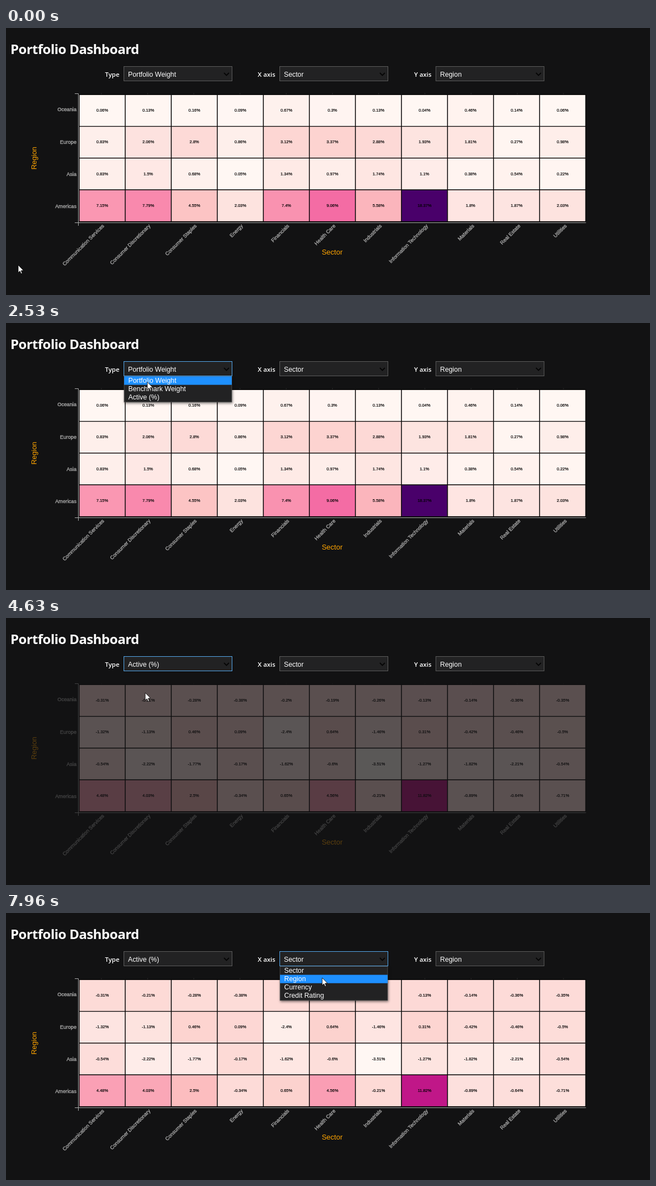
Animation of 1161x482 px, one loop 8 s. Source, as an HTML page:

```html
<!DOCTYPE html>
<html lang="en">
<head>
<meta charset="utf-8">
<title>Portfolio Dashboard</title>
<style>
  html, body { margin: 0; height: 100%; overflow: hidden; background: #121213; }
  svg { display: block; font-family: "Liberation Sans", Arial, sans-serif; }
  .title, .label { font-family: "Open Sans", "Noto Sans", sans-serif; fill: #fff; }
  .title { font-size: 24px; font-weight: 700; letter-spacing: -.5px; }
  .label { font-size: 11.4px; font-weight: 600; text-anchor: end; }
  .field { font-size: 12.3px; fill: #fff; }
  .value { font-size: 7.4px; text-anchor: middle; stroke: #000; stroke-width: .2px; }
  .tick { font-size: 9.2px; text-anchor: end; fill: #aaa; stroke: #aaa; stroke-width: .35px; }
  .axis { font-size: 13px; text-anchor: middle; fill: orange; }
  .list { filter: drop-shadow(1px 2px 2px rgba(0, 0, 0, .5)); }
</style>
</head>
<body>
<svg id="stage" width="1161" height="482" viewBox="0 0 1161 482"></svg>
<script>
const LOOP = 8000;
const sectors = ['Communication Services', 'Consumer Discretionary', 'Consumer Staples', 'Energy', 'Financials',
  'Health Care', 'Industrials', 'Information Technology', 'Materials', 'Real Estate', 'Utilities'];
const regions = ['Oceania', 'Europe', 'Asia', 'Americas'];
const weights = [
  [.06, .13, .16, .09, .67, .3, .13, .04, .46, .14, .06],
  [.83, 2.06, 2.8, .86, 3.12, 3.37, 2.88, 1.93, 1.81, .27, .98],
  [.83, 1.5, .68, .05, 1.34, .97, 1.74, 1.1, .38, .54, .22],
  [7.15, 7.79, 4.55, 2.03, 7.4, 9.06, 5.58, 18.37, 1.8, 1.87, 2.03]];
const active = [
  [-.31, -.21, -.28, -.38, -.2, -.19, -.26, -.13, -.14, -.36, -.35],
  [-1.32, -1.13, .46, .09, -2.4, .64, -1.46, .31, -.42, -.46, -.5],
  [-.54, -2.22, -1.77, -.17, -1.62, -.6, -3.51, -1.27, -1.82, -2.21, -.54],
  [4.48, 4.03, 2.5, -.34, .65, 4.56, -.21, 11.82, -.89, -.64, -.71]];

// Red-purple colour scale, smoothed with a cubic B-spline
const ramp = ['fff7f3', 'fde0dd', 'fcc5c0', 'fa9fb5', 'f768a1', 'dd3497', 'ae017e', '7a0177', '49006a']
  .map(hex => [0, 2, 4].map(i => parseInt(hex.slice(i, i + 2), 16)));
function color(t) {
  const n = ramp.length - 1, i = Math.min(n - 1, Math.floor(t * n)), f = t * n - i;
  const rgb = [0, 1, 2].map(k => {
    const b = ramp[i][k], c = ramp[i + 1][k];
    const a = i > 0 ? ramp[i - 1][k] : 2 * b - c;
    const d = i < n - 1 ? ramp[i + 2][k] : 2 * c - b;
    return Math.round(((1 - f) ** 3 * a + (4 - 6 * f * f + 3 * f ** 3) * b
      + (1 + 3 * f + 3 * f * f - 3 * f ** 3) * c + f ** 3 * d) / 6);
  });
  return `rgb(${rgb})`;
}

const text = (cls, x, y, str, extra = '') => `<text class="${cls}" x="${x}" y="${y}" ${extra}>${str}</text>`;
const rect = (x, y, w, h, extra) => `<rect x="${x}" y="${y}" width="${w}" height="${h}" ${extra}/>`;

function chart(id, data, min, max) {
  let s = rect(131.5, 119.5, 914, 231, 'fill="#0a0a0a"');
  data.forEach((row, r) => row.forEach((v, c) => {
    const x = 132 + 83 * c, y = 120.3 + 57.3 * r;
    s += rect(x, y, 83, 57.3, `fill="${color((v - min) / (max - min))}" stroke="#0a0a0a" stroke-width="1.3"`);
    s += text('value', x + 41.5, 150.8 + 57.5 * r, v + '%');
  }));
  regions.forEach((name, r) => s += text('tick', 127, 150.3 + 58.2 * r, name));
  sectors.forEach((name, c) => {
    const x = 177.5 + 83.4 * c;
    s += text('tick', x, 358, name, `transform="rotate(-45 ${x} 358)"`);
    s += rect(171.5 + 83.3 * c, 117.5, 1, 2, 'fill="#333"');
  });
  s += '<path d="M124 118.5H130.5V357M124 351.5H1045.5" fill="none" stroke="#aaa"/>';
  s += text('axis', 588, 409, 'Sector') + text('axis', 55, 235, 'Region', 'transform="rotate(-90 55 235)"');
  return `<g id="${id}">${s}</g>`;
}

const select = (id, x, label, value) =>
  text('label', x - 7.5, 88, label) +
  rect(x + .5, 69.5, 195, 26, `id="${id}Box" fill="#222223" stroke="#5c5c5c"`) +
  text('field', x + 8, 87.5, value, `id="${id}Value"`) +
  `<path d="M${x + 181} 81l4.5 4.5l4.5 -4.5" fill="none" stroke="#050505" stroke-width="1.8"/>`;

const list = (id, x, items) => `<g id="${id}List">` +
  rect(x + 1, 96.5, 194, 15.1 * items.length + 1, 'class="list" fill="#222223" stroke="#555" stroke-width=".8"') +
  rect(x + 1, 96.5, 194, 15.1, `id="${id}Hover" fill="#1e90ff"`) +
  items.map((item, i) => text('field', x + 8.5, 108 + 15.1 * i, item)).join('') + '</g>';

const stage = document.getElementById('stage');
stage.innerHTML =
  text('title', 8, 47, 'Portfolio Dashboard') +
  select('type', 212, 'Type', 'Portfolio Weight') +
  select('xAxis', 493, 'X axis', 'Sector') +
  select('yAxis', 774.5, 'Y axis', 'Region') +
  chart('weightChart', weights, .04, 18.37) +
  chart('activeChart', active, -3.51, 18.37) +
  list('type', 212, ['Portfolio Weight', 'Benchmark Weight', 'Active (%)']) +
  list('xAxis', 493, ['Sector', 'Region', 'Currency', 'Credit Rating']) +
  '<path id="cursor" d="M0 0V13.6L3.1 10.8L5.2 15.6L7.2 14.7L5.2 10.1L9.5 9.7Z" fill="#fff" stroke="#000" stroke-width=".8"/>';

const el = {};
stage.querySelectorAll('[id]').forEach(e => el[e.id] = e);

const clamp = v => Math.max(0, Math.min(1, v));
const smooth = u => u * u * (3 - 2 * u);
const out = u => 1 - (1 - u) ** 2;
const fastOut = u => 1 - (1 - u) ** 4;
const backIn = u => u * u * (2.70158 * u - 1.70158);

// Pointer moves: start and end time, easing, then points of a line or quadratic curve
const moves = [
  [660, 760, smooth, [22, 428], [-12, 384]],
  [930, 1600, out, [-10, 124], [120, 44], [258, 83]],
  [2330, 2760, smooth, [258, 83], [251, 135]],
  [4700, 5200, smooth, [251, 135], [420, 60], [570, 80]],
  [5460, 6000, fastOut, [570, 82], [769, 88], [797, 85]],
  [6200, 6500, smooth, [797, 85], [620, 80]],
  [7030, 7500, smooth, [620, 80], [570, 114]],
  [7830, 7960, smooth, [570, 114], [570, 117]]];

function pointer(t) {
  const [start, end, ease, a, ...rest] = moves.filter(m => t >= m[0]).pop() || moves[0];
  const u = ease(clamp((t - start) / (end - start))), b = rest[rest.length - 1];
  return [0, 1].map(k => rest.length > 1
    ? (1 - u) ** 2 * a[k] + 2 * u * (1 - u) * rest[0][k] + u * u * b[k]
    : a[k] + (b[k] - a[k]) * u);
}

const show = (e, on) => e.setAttribute('display', on ? 'inline' : 'none');
const focus = (e, on) => e.setAttribute('stroke', on ? '#55a8ec' : '#5c5c5c');

function draw(t) {
  const [x, y] = pointer(t);
  el.cursor.setAttribute('transform', `translate(${x} ${y})`);

  const row = clamp(Math.floor((y - 96.5) / 15.1) / 2) * 2;
  for (const [id, from, to] of [['type', 1960, 3300], ['xAxis', 6660, LOOP]]) {
    show(el[id + 'List'], t >= from && t < to);
    el[id + 'Hover'].setAttribute('y', 96.5 + 15.1 * row);
  }
  focus(el.typeBox, t >= 1960 && t < 6660);
  focus(el.xAxisBox, t >= 6660);
  el.typeValue.textContent = t < 3300 ? 'Portfolio Weight' : 'Active (%)';

  // The old chart pulls back and flies off to the right, the new one fades in
  const leave = backIn(clamp((t - 3320) / 740));
  el.weightChart.setAttribute('transform', `translate(${400 * leave} 0)`);
  el.weightChart.setAttribute('opacity', clamp(1 - leave));
  show(el.weightChart, t < 4060);
  el.activeChart.setAttribute('opacity', clamp((t - 4380) / 820));
  show(el.activeChart, t >= 4380);
}

function frame() {
  draw(performance.now() % LOOP);
  requestAnimationFrame(frame);
}
frame();
</script>
</body>
</html>
```
